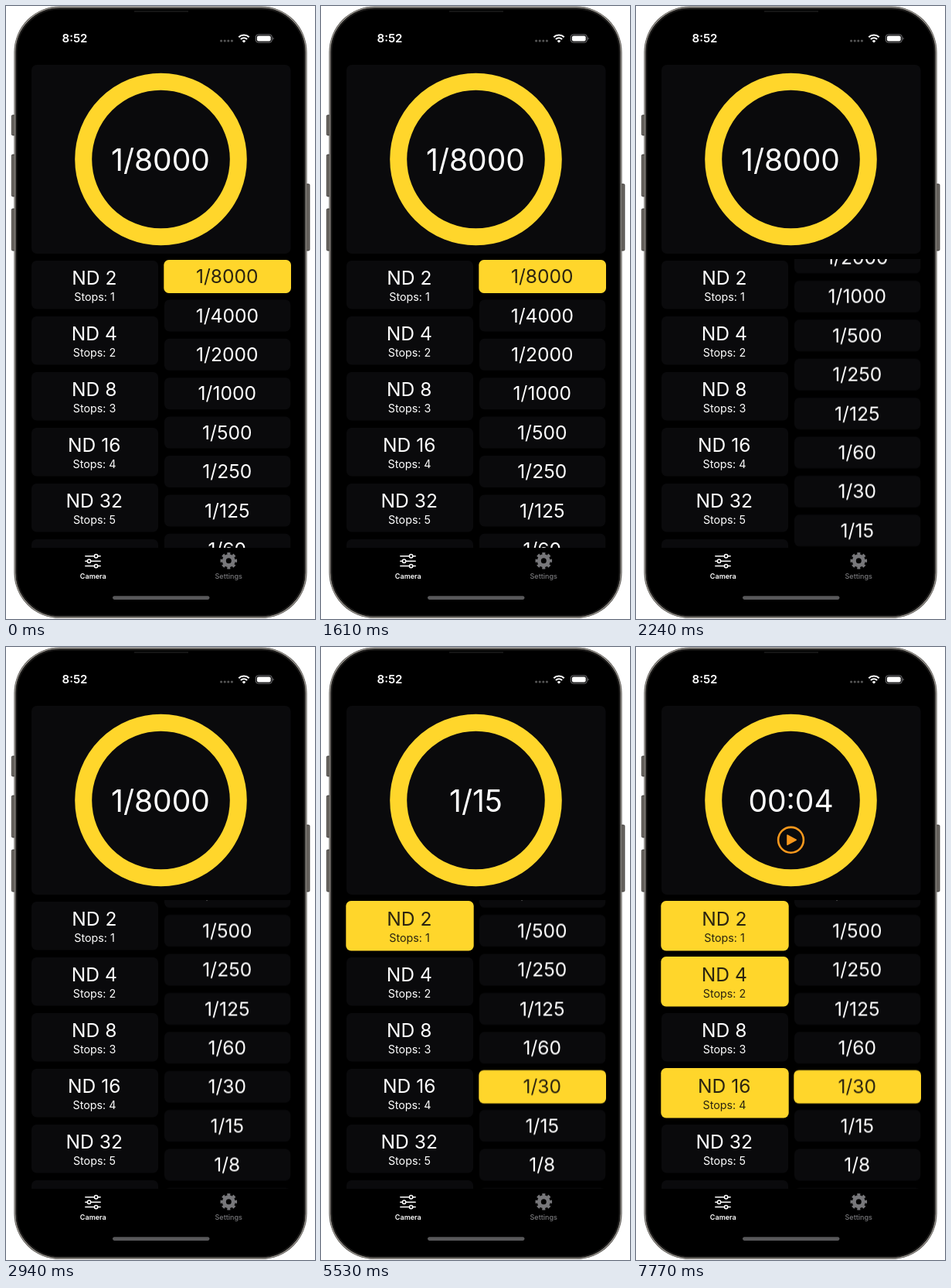
Recreate the animation shown at these times as an HTML page. Size 400x792 px, loop 8 s.

```html
<!DOCTYPE html>
<html lang="en">
<head>
<meta charset="utf-8">
<title>Exposure calculator</title>
<style>
html, body { margin: 0; width: 100%; height: 100%; overflow: hidden; background: #fff; }
svg { display: block; width: 400px; height: 792px; }
text { font-family: Inter, "Liberation Sans", sans-serif; fill: #fff; text-anchor: middle; }
.card { fill: #0a0a0c; }
.big { font-size: 39px; }
.title { font-size: 24.6px; }
.sub { font-size: 14.3px; }
.tab { font-size: 9px; font-weight: 600; }
.on rect { fill: #ffd62b; }
.on text { fill: #2b2410; }

#shutter { animation: scroll 8s linear infinite; }
@keyframes scroll {
  0%, 23.625% { transform: translateY(0); }
  24.5% { transform: translateY(-8px); }
  25.375% { transform: translateY(-22.6px); }
  26.25% { transform: translateY(-52px); }
  27.125% { transform: translateY(-90px); }
  28% { transform: translateY(-125px); }
  28.875% { transform: translateY(-153px); }
  29.75% { transform: translateY(-173px); }
  30.625%, 100% { transform: translateY(-184.5px); }
}

/* taps: shutter 3.71 s, ND 2 5.04 s, ND 16 5.74 s, ND 4 6.93 s */
.from, .until { animation: 8s step-end infinite; }
.from.shot { animation-name: fromShot; }
.from.nd2 { animation-name: fromNd2; }
.from.nd16 { animation-name: fromNd16; }
.from.nd4 { animation-name: fromNd4; }
.until.shot { animation-name: untilShot; }
.until.nd2 { animation-name: untilNd2; }
.until.nd16 { animation-name: untilNd16; }
.until.nd4 { animation-name: untilNd4; }
@keyframes fromShot { 0% { opacity: 0 } 46.375%, 100% { opacity: 1 } }
@keyframes fromNd2 { 0% { opacity: 0 } 63%, 100% { opacity: 1 } }
@keyframes fromNd16 { 0% { opacity: 0 } 71.75%, 100% { opacity: 1 } }
@keyframes fromNd4 { 0% { opacity: 0 } 86.625%, 100% { opacity: 1 } }
@keyframes untilShot { 0% { opacity: 1 } 46.375%, 100% { opacity: 0 } }
@keyframes untilNd2 { 0% { opacity: 1 } 63%, 100% { opacity: 0 } }
@keyframes untilNd16 { 0% { opacity: 1 } 71.75%, 100% { opacity: 0 } }
@keyframes untilNd4 { 0% { opacity: 1 } 86.625%, 100% { opacity: 0 } }
</style>
</head>
<body>
<svg viewBox="0 0 400 792">
  <defs>
    <clipPath id="lists"><rect x="28" y="327" width="344" height="373"/></clipPath>
  </defs>

  <!-- phone body -->
  <g fill="#6b6762" stroke="#2c2a28" stroke-width=".8">
    <rect x="7.4" y="141" width="5" height="26" rx="1.2"/>
    <rect x="7.4" y="192" width="5" height="54" rx="1.2"/>
    <rect x="7.4" y="262" width="5" height="54" rx="1.2"/>
    <rect x="388" y="230" width="5" height="86" rx="1.2"/>
  </g>
  <rect x="10.5" y=".5" width="379" height="790.5" rx="59" fill="#3b3936"/>
  <rect x="11.8" y="1.8" width="376.4" height="787.9" rx="57.7" fill="#000" stroke="#96928c" stroke-width="1.5"/>
  <rect x="13.6" y="3.6" width="372.8" height="784.3" rx="56" fill="none" stroke="#1d1c1b" stroke-width="1.6"/>
  <path d="M166 7h70" stroke="#1c1c1c" stroke-width="1.6"/>

  <!-- status bar -->
  <text x="89" y="47.3" font-size="15" font-weight="600">8:52</text>
  <g fill="#555">
    <circle cx="278.6" cy="45" r="1.6"/><circle cx="283.2" cy="45" r="1.6"/>
    <circle cx="287.8" cy="45" r="1.6"/><circle cx="292.4" cy="45" r="1.6"/>
  </g>
  <g fill="none" stroke="#fff" stroke-width="2.1">
    <path d="M301.3 40.3A9.5 9.5 0 0 1 314.7 40.3M303.9 42.9A5.8 5.8 0 0 1 312.1 42.9"/>
  </g>
  <path d="M308 47.5L305.7 45.2A3.2 3.2 0 0 1 310.3 45.2Z" fill="#fff"/>
  <rect x="323.3" y="36.9" width="21" height="10.2" rx="3.2" fill="none" stroke="#77777a"/>
  <rect x="324.9" y="38.5" width="17.8" height="7" rx="1.9" fill="#fff"/>
  <path d="M345.5 40.2a2 2 0 0 1 0 3.6z" fill="#77777a"/>

  <!-- readout -->
  <rect class="card" x="33" y="76" width="335.5" height="244" rx="7"/>
  <circle cx="200.5" cy="198" r="100.3" fill="none" stroke="#ffd62b" stroke-width="22"/>
  <g class="big">
    <g class="until shot"><text x="200" y="212.5">1/8000</text></g>
    <g class="from shot"><g class="until nd2"><text x="200.5" y="212.5">1/30</text></g></g>
    <g class="from nd2"><g class="until nd16"><text x="200.5" y="212.5">1/15</text></g></g>
    <g class="from nd16"><g class="until nd4"><text x="203.5" y="212.5">1"</text></g></g>
    <g class="from nd4">
      <text x="200.5" y="212.5">00:04</text>
      <circle cx="200.5" cy="249.3" r="16.4" fill="none" stroke="#f7981d" stroke-width="2.6"/>
      <path d="M196 243.2v12.2l11.2-6.1z" fill="#f7981d" stroke="#f7981d" stroke-width="1.6" stroke-linejoin="round"/>
    </g>
  </g>

  <g clip-path="url(#lists)">
    <g id="filters"></g>
    <g id="shutter"></g>
  </g>

  <!-- tab bar -->
  <g stroke="#fff" stroke-width="1.5" stroke-linecap="round" fill="#000">
    <path d="M102.8 710.8h19.4M102.8 717.2h19.4M102.8 723.6h19.4"/>
    <circle cx="116.6" cy="710.8" r="2.2"/>
    <circle cx="107.6" cy="717.2" r="2.2"/>
    <circle cx="116.6" cy="723.6" r="2.2"/>
  </g>
  <text class="tab" x="112.8" y="740">Camera</text>
  <g fill="none" stroke="#77777a">
    <circle cx="288.3" cy="716.7" r="6" stroke-width="5"/>
    <circle cx="288.3" cy="716.7" r="9.1" stroke-width="3.4" pathLength="16"
      stroke-dasharray="1.1 .9" stroke-dashoffset=".55"/>
  </g>
  <text class="tab" x="288.2" y="740" style="fill:#77777a;font-weight:500">Settings</text>
  <rect x="138" y="762.3" width="125.5" height="4.6" rx="2.3" fill="#58585a"/>
</svg>
<script>
const box = (x, y, w, h, extra = '') =>
  `<rect x="${x}" y="${y}" width="${w}" height="${h}" rx="6.5" ${extra}/>`;

// A dark card, with a yellow one on top when it gets selected
function card(x, y, w, h, label, when) {
  const off = box(x, y, w, h, 'class="card"') + label;
  const on = when
    ? `<g class="on ${when}">${box(x - .7, y - 1, w + 1.4, h + 2)}${label}</g>` : '';
  return off + on;
}

const filterTaps = { 1: 'from nd2', 2: 'from nd4', 4: 'from nd16' };
let filters = '';
for (let stop = 1; stop <= 6; stop++) {
  const y = 329 + (stop - 1) * 72;
  const label = `<text class="title" x="114.3" y="${y + 31}">ND ${2 ** stop}</text>` +
    `<text class="sub" x="114.5" y="${y + 51.8}">Stops: ${stop}</text>`;
  filters += card(33, y, 164, 62.5, label, filterTaps[stop]);
}
document.getElementById('filters').innerHTML = filters;

const speeds = [8000, 4000, 2000, 1000, 500, 250, 125, 60, 30, 15, 8, 4];
const speedTaps = { 8000: 'until shot', 30: 'from shot' };
document.getElementById('shutter').innerHTML = speeds.map((speed, i) => {
  const y = 329 + i * 50.4;
  const label = `<text class="title" x="286.3" y="${y + 29.2}">1/${speed}</text>`;
  return card(205, y, 163.3, 41, label, speedTaps[speed]);
}).join('');
</script>
</body>
</html>
```
